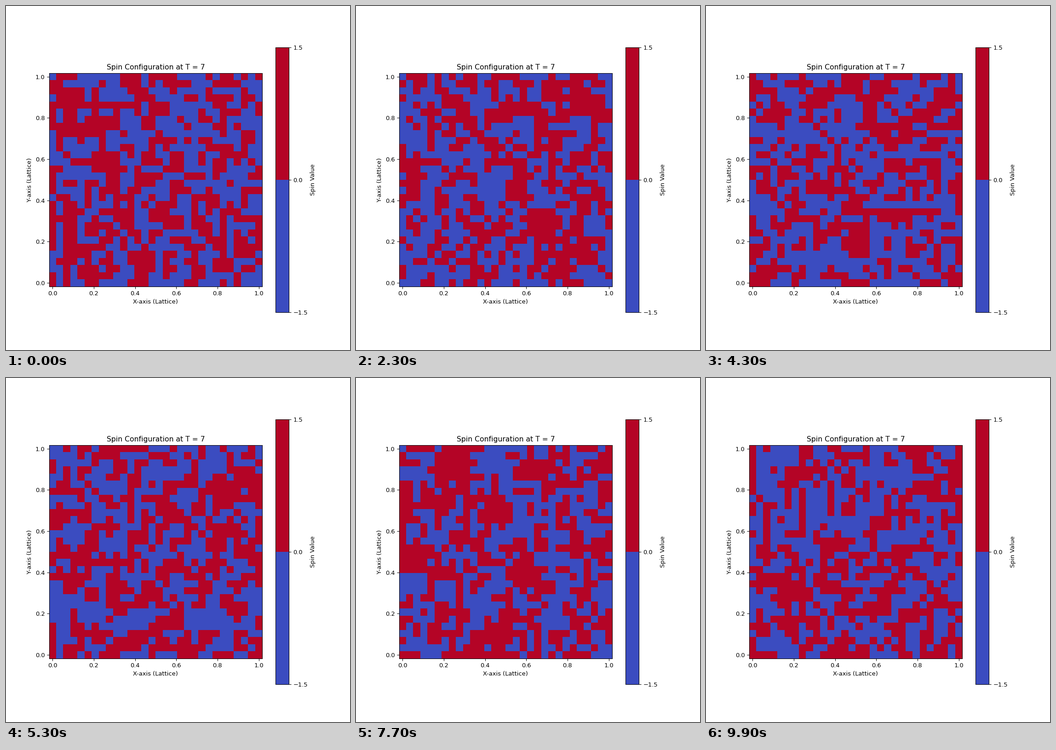
Animation, 748 px wide and 748 px high, one loop 10000 ms. Source, as a matplotlib script:

```python
import math

import matplotlib.pyplot as plt
import numpy as np
from matplotlib.animation import FuncAnimation
from matplotlib.colors import BoundaryNorm

SIZE, INCHES = 748, 8
N = 30
TEMP = 7
FRAMES, INTERVAL = 100, 100

rng = np.random.default_rng(7)
accept = {dE: math.exp(-dE / TEMP) for dE in (-8, -4, 0, 4, 8)}


def sweep(s):
    """One Metropolis sweep: N*N random single-spin trials, periodic edges."""
    sites = rng.integers(0, N, (N * N, 2)).tolist()
    for (i, j), u in zip(sites, rng.random(N * N).tolist()):
        near = s[i - 1][j] + s[(i + 1) % N][j] + s[i][j - 1] + s[i][(j + 1) % N]
        if u < accept[2 * s[i][j] * near]:
            s[i][j] = -s[i][j]


def simulate():
    s = rng.choice([-1, 1], (N, N)).tolist()
    states = []
    for _ in range(FRAMES):
        sweep(s)
        states.append(np.array(s))
    return states


states = simulate()
axis = np.linspace(0, 1, N)

fig, ax = plt.subplots(figsize=(INCHES, INCHES), dpi=SIZE / INCHES)
cmap = plt.get_cmap("coolwarm", 2)
norm = BoundaryNorm([-1.5, 0, 1.5], cmap.N)
mesh = ax.pcolormesh(axis, axis, states[0], cmap=cmap, norm=norm, shading="nearest")
ax.set_aspect("equal")
ax.set_title(f"Spin Configuration at T = {TEMP}")
ax.set_xlabel("X-axis (Lattice)")
ax.set_ylabel("Y-axis (Lattice)")
fig.colorbar(mesh, ax=ax, ticks=[-1.5, 0, 1.5], label="Spin Value")


def update(k):
    mesh.set_array(states[k])
    return (mesh,)


anim = FuncAnimation(fig, update, frames=FRAMES, interval=INTERVAL,
                     repeat=True, repeat_delay=0, blit=False)
plt.show()
```
